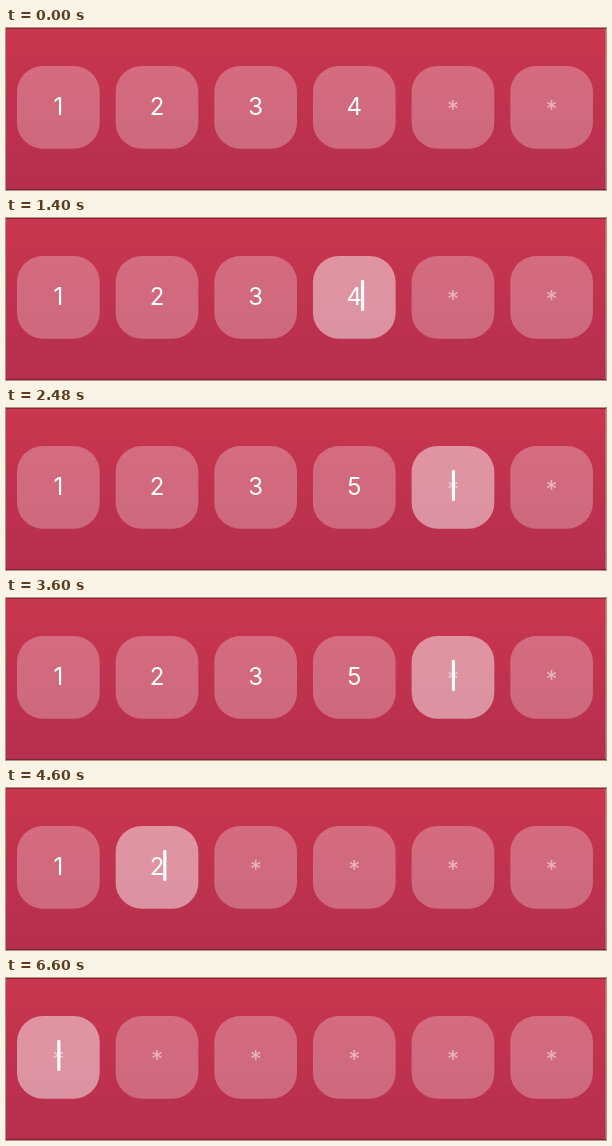
Write an HTML page with a canvas that moves like this. It is 600 px wide and 162 px high and loops after 7 s.

```html
<!DOCTYPE html>
<html lang="en">
<head>
<meta charset="utf-8">
<title>Code input</title>
<style>
  html, body { margin: 0; width: 100%; height: 100%; overflow: hidden; background: #bf324e; }
  canvas { display: block; width: 600px; height: 162px; }
</style>
</head>
<body>
<canvas id="stage" width="600" height="162"></canvas>
<script>
const W = 600, H = 162, LOOP = 7000;
const CELL = { x: 11, y: 38, size: 82.7, pitch: 98.65, radius: 26, count: 6 };
const FONT = '400 24px Inter, Roboto, sans-serif';

// start time, typed digits, focused cell (-1 for none)
const STEPS = [
  [0, '1234', -1],
  [880, '1234', 3],
  [2440, '1235', 4],
  [3840, '1235', 3],
  [4200, '123', 2],
  [4600, '12', 1],
  [5080, '1', 0],
  [5480, '', 0]
];

// caret fades: out start, out end, in start, in end
const BLINKS = [
  [1380, 1600, 1900, 2040],
  [2940, 3200, 3490, 3600],
  [5940, 6240, 6490, 6600]
];

const ctx = document.getElementById('stage').getContext('2d');

const backdrop = ctx.createLinearGradient(0, 0, 0, H);
backdrop.addColorStop(0, '#ca364f');
backdrop.addColorStop(1, '#b52f4d');

const white = alpha => `rgba(255,255,255,${alpha})`;

function smooth(t, from, to) {
  const p = Math.min(1, Math.max(0, (t - from) / (to - from)));
  return p * p * (3 - 2 * p);
}

function caretAlpha(t) {
  return BLINKS.reduce((a, [o0, o1, i0, i1]) =>
    a * (1 - smooth(t, o0, o1) + smooth(t, i0, i1)), 1);
}

function fillRound(x, y, w, h, r, color) {
  ctx.fillStyle = color;
  ctx.beginPath();
  ctx.roundRect(x, y, w, h, r);
  ctx.fill();
}

function drawStar(cx) {
  const m = ctx.measureText('*');
  const base = 76.7 + (m.actualBoundingBoxAscent - m.actualBoundingBoxDescent) / 2;
  ctx.fillStyle = white(0.5);
  ctx.fillText('*', cx, base);
}

function drawCell(i, digit, focused, t) {
  const x = CELL.x + i * CELL.pitch;
  const cx = x + CELL.size / 2;
  fillRound(x, CELL.y, CELL.size, CELL.size, CELL.radius, white(focused ? 0.47 : 0.27));

  if (digit) {
    ctx.fillStyle = '#fff';
    ctx.fillText(digit, cx, 87);
  } else {
    drawStar(cx);
  }

  if (focused) {
    const edge = cx + 0.5 + (digit ? ctx.measureText(digit).width / 2 : 0);
    fillRound(edge - 1.6, 61.7, 3.2, 31.3, 1.6, white(caretAlpha(t)));
  }
}

function draw(t) {
  const [, digits, focus] = STEPS.filter(s => s[0] <= t).pop();
  ctx.fillStyle = backdrop;
  ctx.fillRect(0, 0, W, H);
  ctx.fillStyle = 'rgba(0,0,0,.3)';
  ctx.fillRect(0, 0, W, 1);
  ctx.fillRect(0, H - 1, W, 1);
  ctx.fillStyle = white(0.2);
  ctx.fillRect(W - 1, 1, 1, H - 2);

  ctx.font = FONT;
  ctx.textAlign = 'center';
  ctx.textBaseline = 'alphabetic';
  for (let i = 0; i < CELL.count; i++) drawCell(i, digits[i], i === focus, t);
}

const start = performance.now();
function tick() {
  draw((performance.now() - start) % LOOP);
  requestAnimationFrame(tick);
}
tick();
</script>
</body>
</html>
```
